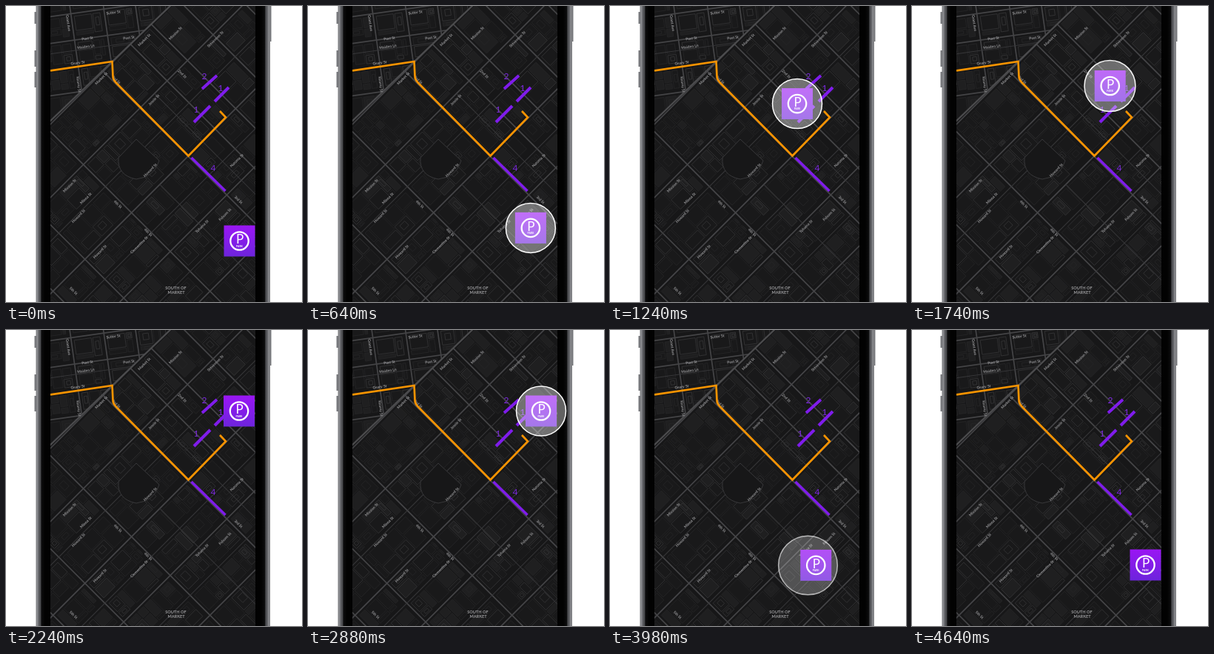
Animation, 400 px wide and 400 px high, one loop 4.8 s. Source, as an HTML page with a canvas:

```html
<!DOCTYPE html>
<html lang="en">
<head>
<meta charset="utf-8">
<title>Parking button drag</title>
<style>
html, body { margin: 0; width: 100%; height: 100%; overflow: hidden; background: #fff; }
canvas { display: block; width: 400px; height: 400px; }
</style>
</head>
<body>
<canvas id="stage" width="400" height="400"></canvas>
<script>
const LOOP = 4800;
const ctx = document.getElementById('stage').getContext('2d');
const FONT = 'Lato, "Open Sans", sans-serif';

// Button centre: time, x, y
const KEYS = [
  [0, 315.5, 317.5], [20, 315.5, 317.5], [440, 313.5, 310.5], [500, 313.5, 310.5],
  [640, 301, 300], [960, 253, 217.5], [1080, 242.5, 170], [1440, 267.5, 108],
  [1720, 267.5, 108], [2240, 315, 109.5], [2880, 315, 109.5], [2940, 313, 113.5],
  [3220, 275, 214], [3400, 267, 287.5], [3480, 267, 309], [3560, 267.5, 318],
  [3840, 267.5, 318], [4300, 315.5, 317.5], [LOOP, 315.5, 317.5]
];
const TOUCHES = [
  { down: 20, held: 440, up: 1720, gone: 2120 },
  { down: 2420, held: 2860, up: 3840, gone: 4240 }
];

const clamp = (v, lo, hi) => Math.min(hi, Math.max(lo, v));
const ramp = (t, a, b) => clamp((t - a) / (b - a), 0, 1);
const smooth = p => p * p * (3 - 2 * p);
const mix = (a, b, p) => a + (b - a) * p;

// Monotone cubic interpolation through the keys
function slope(i, k) {
  if (i < 1 || i > KEYS.length - 2) return 0;
  const rate = j => (KEYS[j + 1][k] - KEYS[j][k]) / (KEYS[j + 1][0] - KEYS[j][0]);
  const a = rate(i - 1), b = rate(i);
  return a * b <= 0 ? 0 : 2 * a * b / (a + b);
}
function place(t) {
  let i = 0;
  while (i < KEYS.length - 2 && t >= KEYS[i + 1][0]) i++;
  const h = KEYS[i + 1][0] - KEYS[i][0], p = (t - KEYS[i][0]) / h, q = 1 - p;
  return [1, 2].map(k =>
    KEYS[i][k] * (1 + 2 * p) * q * q + KEYS[i + 1][k] * p * p * (3 - 2 * p) +
    h * (slope(i, k) * p * q * q - slope(i + 1, k) * p * p * q));
}

function random(seed) {
  return () => {
    seed = (seed * 1664525 + 1013904223) >>> 0;
    return seed / 4294967296;
  };
}

function line(g, color, width, ...pts) {
  g.strokeStyle = color;
  g.lineWidth = width;
  g.beginPath();
  for (let i = 0; i < pts.length; i += 2) g.lineTo(pts[i], pts[i + 1]);
  g.stroke();
}

function text(g, str, x, y, size, color, turn = 0, weight = 400) {
  g.save();
  g.translate(x, y);
  g.rotate(turn * Math.PI / 180);
  g.font = `${weight} ${size}px ${FONT}`;
  g.textAlign = 'center';
  g.textBaseline = 'middle';
  g.fillStyle = color;
  g.fillText(str, 0, 0);
  g.restore();
}

// Fills the blocks between two sets of roads with faint building outlines
function blocks(g, us, vs, rnd) {
  g.lineWidth = 0.8;
  for (let i = 0; i < us.length - 1; i++) {
    for (let j = 0; j < vs.length - 1; j++) {
      const v0 = vs[j] + 4, v1 = vs[j + 1] - 4;
      for (let u = us[i] + 4; u < us[i + 1] - 8;) {
        const w = Math.min(8 + rnd() * 18, us[i + 1] - 4 - u);
        for (let v = v0; v < v1 - 6;) {
          const h = Math.min(9 + rnd() * 22, v1 - v);
          g.fillStyle = rnd() < 0.3 ? '#1f1f20' : '#19191a';
          g.strokeStyle = rnd() < 0.3 ? '#363637' : '#262627';
          g.fillRect(u, v, w - 2, h - 2);
          g.strokeRect(u, v, w - 2, h - 2);
          if (rnd() < 0.3) g.strokeRect(u + w * 0.25, v + h * 0.2, w * 0.4, h * 0.4);
          v += h;
        }
        u += w;
      }
    }
  }
}

function roads(g, us, vs, color, width) {
  us.forEach(u => line(g, color, width, u, vs[0], u, vs[vs.length - 1]));
  vs.forEach(v => line(g, color, width, us[0], v, us[us.length - 1], v));
}

function drawMap(g) {
  g.save();
  g.beginPath();
  g.rect(60, 0, 277, 400);
  g.clip();
  g.fillStyle = '#171718';
  g.fillRect(60, 0, 277, 400);

  // Upright quarter in the upper left
  g.save();
  g.translate(60, 87);
  g.rotate(-8 * Math.PI / 180);
  const ux = [-30, 38, 83, 126, 172, 220], uy = [-110, -72, -36, 0, 34, 76, 110];
  blocks(g, ux, uy, random(21));
  roads(g, ux, uy, '#444446', 1.7);
  line(g, '#38383a', 1, -30, -22, 130, -22);
  g.restore();

  // Diagonal quarter
  g.save();
  g.beginPath();
  g.moveTo(222, 0);
  g.lineTo(400, 0);
  g.lineTo(400, 400);
  g.lineTo(60, 400);
  g.lineTo(60, 155);
  g.clip();
  g.fillStyle = '#171718';
  g.fillRect(0, 0, 400, 400);
  g.translate(246, 203);
  g.rotate(-Math.PI / 4);
  const dx = [-330, -258, -197, -108, 0, 52, 91, 140, 200, 270];
  const dy = [-162, -92, -50, 0, 38, 74, 112, 150, 230];
  const alleys = [-50, 38, 112];
  blocks(g, dx, dy, random(8));
  roads(g, dx, dy.filter(v => !alleys.includes(v)), '#454547', 1.7);
  alleys.forEach(v => line(g, '#373739', 1, -330, v, 270, v));
  line(g, '#373739', 1, 28, -92, 28, 230);
  line(g, '#373739', 1, -54, 0, -54, 230);
  g.restore();
  line(g, '#4c4c4e', 2.2, 56, 159, 226, -4);

  // Park in the middle
  g.beginPath();
  g.moveTo(152, 205);
  g.lineTo(176, 180);
  g.lineTo(207, 209);
  g.quadraticCurveTo(201, 231, 176, 234);
  g.quadraticCurveTo(150, 229, 152, 205);
  g.fillStyle = '#171718';
  g.fill();
  g.strokeStyle = '#38383a';
  g.lineWidth = 1;
  g.stroke();

  const names = [
    ['Post St', 110, 44, -8], ['Post St', 166, 43, -8], ['Maiden Ln', 108, 55, -8],
    ['Geary St', 97, 77, -8], ['Sutter St', 145, 9, -8], ['Market St', 129, 98, -45],
    ['Market St', 187, 46, -45], ['Grant Ave', 84, 23, 82], ['Kearny St', 98, 106, 82],
    ['3rd St', 149, 100, 45], ['Jessie St', 200, 127, -45], ['2nd St', 238, 92, 45],
    ['Mission St', 86, 243, -45], ['Mission St', 229, 37, -45], ['Stevenson St', 283, 45, -45],
    ['Minna St', 108, 260, -45], ['Howard St', 98, 284, -45], ['Howard St', 195, 222, -45],
    ['4th St', 151, 268, 45], ['4th St', 192, 306, 45], ['Howard St', 127, 332, -45],
    ['Tehama St', 265, 298, -45], ['Folsom St', 296, 282, -45], ['Clementina St', 180, 323, -45],
    ['3rd St', 314, 262, 45], ['Natoma St', 312, 209, -45], ['5th St', 91, 385, 45]
  ];
  names.forEach(([s, x, y, a]) => text(g, s, x, y, 5, '#98989a', a, 700));
  text(g, 'SOUTH OF', 229.5, 381, 5.6, '#98989a', 0, 700);
  text(g, 'MARKET', 230, 387, 5.6, '#98989a', 0, 700);

  g.strokeStyle = '#f79300';
  g.lineWidth = 2.7;
  g.beginPath();
  g.moveTo(60, 87.3);
  g.lineTo(143.5, 75);
  g.lineTo(144.5, 95);
  g.quadraticCurveTo(144.5, 99.5, 149, 104);
  g.lineTo(246.5, 202.5);
  g.lineTo(297, 150.5);
  g.lineTo(289, 142);
  g.stroke();

  const purple = '#7f1ceb';
  line(g, purple, 4, 265, 112, 285, 94);
  line(g, purple, 4, 282, 129, 301, 110);
  line(g, purple, 4, 254, 157, 276, 135);
  line(g, purple, 3.5, 250.5, 205, 296.5, 250);
  [['2', 268, 95.5], ['1', 290, 111], ['1', 257, 140], ['4', 280, 219.5]]
    .forEach(([s, x, y]) => text(g, s, x, y, 12, '#7d2ae0'));
  g.restore();
}

function drawPhone(g) {
  g.fillStyle = '#fff';
  g.fillRect(0, 0, 400, 400);
  g.fillStyle = '#77787c';
  [[38.5, 8, 16], [38.5, 60, 22], [38.5, 89, 21], [356, 0, 48]]
    .forEach(([x, y, h]) => g.fillRect(x, y, 2.5, h));
  const left = 40.5, width = 316.5;
  const body = g.createLinearGradient(left, 0, left + width, 0);
  [[0, '#77787b'], [2, '#8b8c90'], [4, '#5a5b5f'], [6, '#4a4b4e'], [7.5, '#0c0c0d'], [12, '#020202']]
    .forEach(([d, c]) => {
      body.addColorStop(d / width, c);
      body.addColorStop(1 - d / width, c);
    });
  g.fillStyle = body;
  g.fillRect(left, 0, width, 400);
  drawMap(g);
}

function drawButton(x, y) {
  ctx.save();
  ctx.translate(x, y);
  const fill = ctx.createLinearGradient(0, -21, 0, 21);
  fill.addColorStop(0, '#9a16f4');
  fill.addColorStop(1, '#6d24dc');
  ctx.fillStyle = fill;
  ctx.fillRect(-21, -21, 42, 42);
  ctx.strokeStyle = '#fff';
  ctx.lineWidth = 2.3;
  ctx.beginPath();
  ctx.arc(0, 0, 12.2, 0, Math.PI * 2);
  ctx.stroke();
  text(ctx, 'P', 0.5, -1.5, 17, '#fff');
  text(ctx, 'PARK', 0, 7, 3.4, '#fff', 0, 700);
  ctx.restore();
}

function drawTouch(t, { down, held, up, gone }) {
  if (t < down || t >= gone) return;
  const press = smooth(ramp(t, down, held)), release = ramp(t, up, gone);
  const [x, y] = place(clamp(t, held, up));
  const r = mix(43, 33.5, press) + 18 * release;
  ctx.globalAlpha = press * (1 - release);
  ctx.beginPath();
  ctx.arc(x, y, r, 0, Math.PI * 2);
  ctx.fillStyle = 'rgba(255,255,255,0.38)';
  ctx.fill();
  ctx.strokeStyle = '#fff';
  ctx.lineWidth = 1.5;
  ctx.stroke();
  ctx.globalAlpha = 1;
}

const scene = document.createElement('canvas');
scene.width = scene.height = 400;
drawPhone(scene.getContext('2d'));

const start = performance.now();
function frame() {
  const t = (performance.now() - start) % LOOP;
  ctx.drawImage(scene, 0, 0);
  drawButton(...place(t));
  TOUCHES.forEach(touch => drawTouch(t, touch));
  requestAnimationFrame(frame);
}
frame();
</script>
</body>
</html>
```
